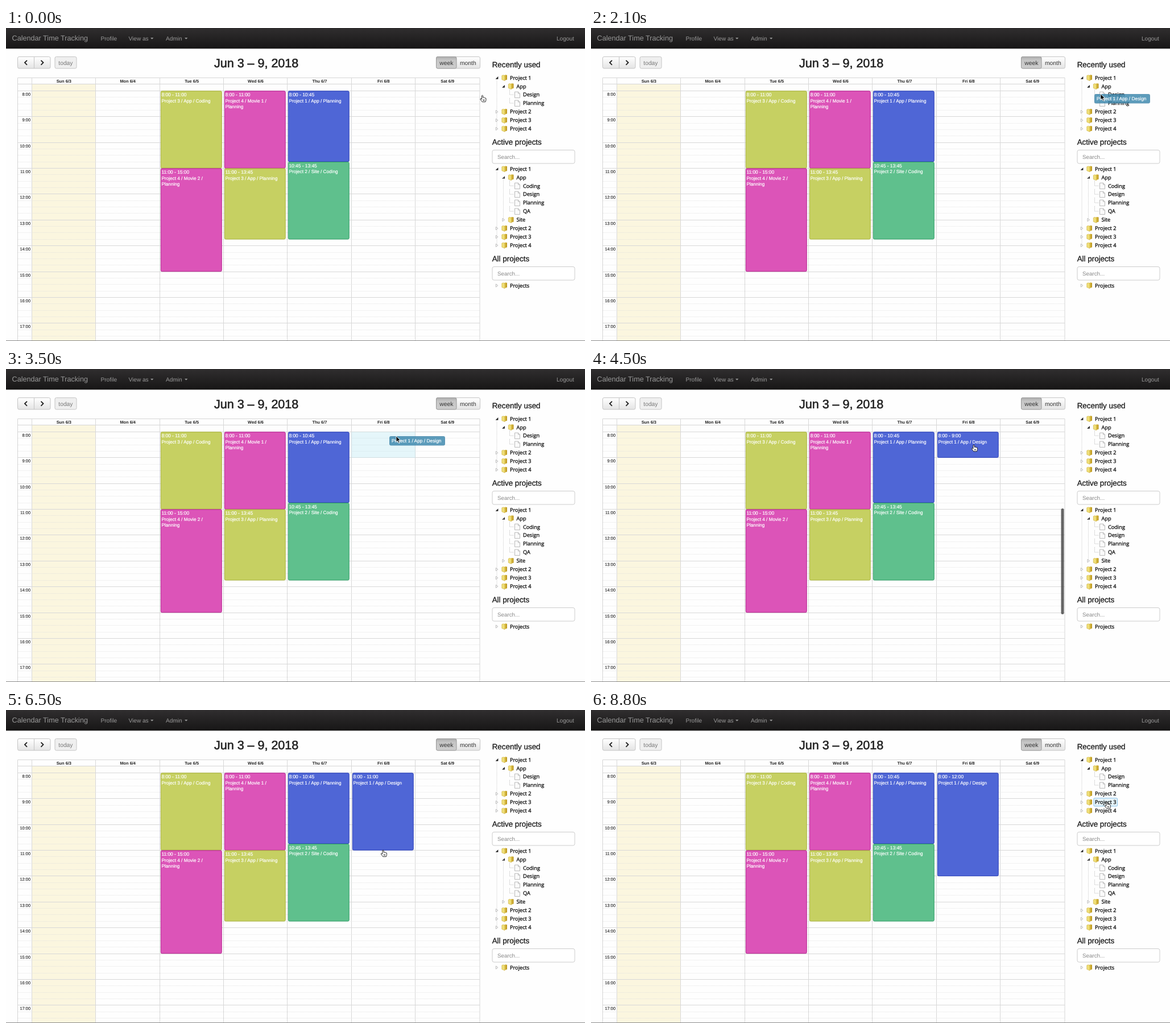
Animation of 1018 by 550 pixels, one loop 9 s. Source, as an HTML page:

```html
<!DOCTYPE html>
<html lang="en">
<head>
<meta charset="utf-8">
<title>Calendar Time Tracking</title>
<style>
html, body { margin: 0; width: 100%; height: 100%; overflow: hidden; background: #fefefe; }
svg { display: block; width: 1018px; height: 550px; }
text { font-family: "Liberation Sans", Arial, sans-serif; white-space: pre; text-rendering: geometricPrecision; }
text.tree { font: 9.2px "Open Sans", sans-serif; fill: #000; stroke: #000; stroke-width: .25px; }
.head { font-size: 13.4px; fill: #222; stroke: #222; stroke-width: .35px; }
.nav { font-size: 10.1px; fill: #999; }
.btn { font-size: 10.3px; fill: #333; }
.day { font-size: 7.4px; font-weight: bold; fill: #222; text-anchor: middle; }
.hour { font-size: 7.4px; fill: #222; stroke: #222; stroke-width: .1px; text-anchor: end; }
.time, .name { font-size: 8.4px; fill: #fff; stroke: #fff; stroke-width: .2px; }
.name { font-size: 8.2px; }
</style>
</head>
<body>
<svg id="stage" viewBox="0 0 1018 550">
  <defs>
    <linearGradient id="bar" x2="0" y2="1"><stop stop-color="#302e2f"/><stop offset="1" stop-color="#171616"/></linearGradient>
    <linearGradient id="up" x2="0" y2="1"><stop stop-color="#fff"/><stop offset="1" stop-color="#e4e4e4"/></linearGradient>
    <linearGradient id="down" x2="0" y2="1"><stop stop-color="#adadad"/><stop offset=".3" stop-color="#c6c6c6"/><stop offset="1" stop-color="#cdcdcd"/></linearGradient>
    <linearGradient id="gold" x2="1" y2="0"><stop stop-color="#ecd45a"/><stop offset="1" stop-color="#b8921c"/></linearGradient>
    <g id="folder">
      <path d="M4.5 1.5 6.5.5 10 1V9L5.5 10.5Z" fill="url(#gold)"/>
      <path d="M.8 2 3.5.8 6 3.2V11L.8 8.8Z" fill="#efdf78" stroke="#c9aa3a" stroke-width=".6"/>
    </g>
    <path id="file" d="M.5.5H6.5L9.5 3.5V11H.5ZM6.5.5V3.5H9.5" fill="#fafafa" stroke="#aaa" stroke-width=".8"/>
    <path id="open" d="M2.4-2.4V2.2H-2.4Z" fill="#222"/>
    <path id="shut" d="M-1.6-2.6 2 0-1.6 2.6Z" fill="#fff" stroke="#aaa" stroke-width=".8"/>
  </defs>
  <g id="page"></g>
  <rect id="drop" width="112.5" height="45.4" fill="#bce8f1" opacity=".38"/>
  <g id="fresh"></g>
  <rect id="scroll" x="826.5" y="245" width="5" height="186" rx="2.5" fill="#4a4a4a"/>
  <rect id="hover" height="14" rx="1" fill="#e7f4f9" stroke="#86c1ea"/>
  <g id="trees"></g>
  <g id="chip">
    <rect x=".5" y=".5" width="97" height="15.5" rx="2" fill="#3a87ad" stroke="#3a80a6" opacity=".82"/>
    <text class="name" x="4" y="11" style="font-size:8.4px">Project 1 / App / Design</text>
  </g>
  <path id="arrow" d="M0 0V10.2L2.4 8 4 11.7 5.8 10.9 4.2 7.4H7.4Z" fill="#000" stroke="#fff" stroke-width=".8"/>
  <path id="hand" d="M-1.1 1Q0-.7 1.1 1V4.3Q2.2 3.5 3 4.6 4 3.9 4.8 5 6.2 4.6 6.4 6V8.5Q6.2 10 5.4 11.8H-.2Q-1.6 10-3.6 7.4-3.8 5.8-2.4 6.2L-1.1 7.3ZM1.6 7.6V10M3.3 7.6V10" fill="#fff" stroke="#111" stroke-width=".9" stroke-linejoin="round"/>
</svg>
<script>
const $ = id => document.getElementById(id);
const LOOP = 9000, STEP = 100;
const X0 = 45.3, COL = 112.4, Y8 = 110.5, SLOT = 11.34, TOP = Y8 - SLOT;

const rect = (x, y, w, h, fill, more = '') =>
  `<rect x="${x}" y="${y}" width="${w}" height="${h}" fill="${fill}" ${more}/>`;
const text = (cls, x, y, s, more = '') => `<text class="${cls}" x="${x}" y="${y}" ${more}>${s}</text>`;
const path = (d, stroke, more = '') => `<path d="${d}" fill="none" stroke="${stroke}" ${more}/>`;
const use = (id, x, y) => `<use href="#${id}" x="${x}" y="${y}"/>`;
const slotY = n => Y8 + n * SLOT;
const dayX = day => Math.floor(X0 + day * COL);
const clock = n => `${8 + Math.floor(n / 4)}:${String(n % 4 * 15).padStart(2, '0')}`;

const paint = {
  lime: ['#c6d062', '#a8b23a'], pink: ['#dc54b8', '#b5218f'],
  blue: ['#4f66d6', '#2a3fb8'], green: ['#5fc08d', '#2f9d66']
};

// from and to count quarter hours after 8:00
function eventBox(day, from, to, color, lines) {
  const x = dayX(day) + 2.3, y = slotY(from) + .3, [fill, edge] = paint[color];
  return rect(x, y, 106.9, slotY(to) - slotY(from) - .6, fill, `stroke="${edge}" rx="2"`) +
    text('time', x + 1.1, y + 9.3, `${clock(from)} - ${clock(to)}`) +
    lines.map((s, i) => text('name', x + 1.2, y + 19.9 + i * 10.7, s)).join('');
}

function navbar() {
  const caret = x => `<path d="M${x} 17h5.4l-2.7 2.8Z" fill="#999"/>`;
  return rect(0, 0, 1018, 36.3, 'url(#bar)') +
    text('nav', 10.5, 22, 'Calendar Time Tracking', 'style="font-size:12.65px"') +
    text('nav', 166.5, 21.5, 'Profile') + text('nav', 215.5, 21.5, 'View as') + caret(254) +
    text('nav', 281, 21.5, 'Admin') + caret(314) + text('nav', 968, 21.5, 'Logout');
}

function toolbar() {
  const box = (x, w, fill = 'url(#up)') =>
    rect(x, 50.5, w, 20.5, fill, 'rx="2.5" stroke="#c4c4c4"');
  const chevron = (x, d) => path(`M${x - 2 * d} 56.8L${x + 2 * d} 60.8L${x - 2 * d} 64.8`, '#222', 'stroke-width="1.9"');
  return box(20.5, 57.5) + path('M49.5 50.5V71', '#c4c4c4') + chevron(35, -1) + chevron(63.5, 1) +
    box(86, 38, '#efefef') + text('btn', 92.3, 64.6, 'today', 'style="fill:#777"') +
    box(756.5, 77) + rect(756.5, 50.5, 35.5, 20.5, 'url(#down)', 'rx="2.5" stroke="#999"') +
    text('btn', 762.3, 64.6, 'week') + text('btn', 798, 64.6, 'month') +
    text('btn', 366, 69.3, 'Jun 3 – 9, 2018', 'style="font-size:21.5px;fill:#222;stroke:#222;stroke-width:.6px"');
}

function grid() {
  let s = rect(X0, 98.5, COL, 451, '#fbf6df');
  for (let n = 0; n < 40; n++) {
    const y = Math.floor(slotY(n)) + .5;
    s += n % 4 ? path(`M21 ${y}H833`, '#dcdcdc', 'stroke-dasharray="1 1" opacity=".75"') : path(`M21 ${y}H833`, '#d8d8d8');
    if (n % 4 === 0) s += text('hour', 43, y + 8.4, clock(n));
  }
  s += path('M20.5 550V87.5H833V550M20.5 98.5H833', '#d6d6d6');
  'Sun Mon Tue Wed Thu Fri Sat'.split(' ').forEach((d, i) => {
    s += path(`M${dayX(i) + .5} 87.5V550`, '#d8d8d8');
    s += text('day', X0 + (i + .5) * COL + .3, 95.8, `${d} 6/${i + 3}`);
  });
  return s;
}

const events =
  eventBox(2, 0, 12, 'lime', ['Project 3 / App / Coding']) +
  eventBox(2, 12, 28, 'pink', ['Project 4 / Movie 2 /', 'Planning']) +
  eventBox(3, 0, 12, 'pink', ['Project 4 / Movie 1 /', 'Planning']) +
  eventBox(3, 12, 23, 'lime', ['Project 3 / App / Planning']) +
  eventBox(4, 0, 11, 'blue', ['Project 1 / App / Planning']) +
  eventBox(4, 11, 23, 'green', ['Project 2 / Site / Coding']);

const search = y => rect(855, y + .5, 145, 23.5, '#fff', 'rx="3" stroke="#ccc"') +
  text('nav', 864, y + 15.8, 'Search...', 'style="font-size:9.8px;fill:#888"');

const sidebar = text('head', 854.7, 69, 'Recently used') + text('head', 854.7, 205.3, 'Active projects') +
  text('head', 854.7, 410, 'All projects') + search(214) + search(419);

// each row: depth, state (+ shut, - open, . leaf), label
function tree(y0, rows) {
  const y = i => y0 + i * 14.93;
  const last = rows.length - 1;
  const dots = 'stroke-dasharray="1 1"';
  let s = last ? path(`M863 ${y0}V${y(last)}`, '#ccc', dots) : '';
  rows.forEach((row, i) => {
    const depth = +row[0], kind = row[1], x = 863 + depth * 11.5;
    if (kind === '.') {
      s += path(`M885.5 ${y(i) - 9}V${y(i)}H893`, '#bbb', dots) + use('file', 894, y(i) - 5.5);
    } else {
      if (row.slice(2) === 'Site') s += path(`M874.5 ${y(1)}V${y(i)}`, '#ccc', dots);
      s += use(kind === '-' ? 'open' : 'shut', x, y(i) + .2) + use('folder', x + 8, y(i) - 5.5);
    }
    s += text('tree', 886 + depth * 11.5, y(i) + 3.3, row.slice(2), 'data-row');
  });
  return s;
}

const rest = ['0+Project 2', '0+Project 3', '0+Project 4'];
$('page').innerHTML = rect(0, 0, 1018, 550, '#fefefe') + navbar() + toolbar() + grid() + events +
  sidebar + rect(0, 549, 1018, 1, '#8a8a8a');
$('trees').innerHTML =
  tree(87.3, ['0-Project 1', '1-App', '2.Design', '2.Planning', ...rest]) +
  tree(247.4, ['0-Project 1', '1-App', '2.Coding', '2.Design', '2.Planning', '2.QA', '1+Site', ...rest]) +
  tree(452.3, ['0+Projects']);

const labels = [...document.querySelectorAll('[data-row]')].map(el => ({
  x: +el.getAttribute('x') - 2, y: el.getAttribute('y') - 10.3, w: el.getComputedTextLength() + 4
}));

// [ms, x, y]
const cursorKeys = [
  [0, 837.5, 118], [300, 850, 119], [900, 906, 118.5], [2000, 906, 118.5], [2100, 896, 116],
  [2600, 794, 107.5], [3500, 686, 118], [3700, 678, 119], [4200, 678, 122], [5100, 663, 155],
  [5400, 663, 156], [5800, 663, 166], [6900, 663, 291.5], [7100, 663, 291.5], [7500, 905, 288],
  [7700, 926, 297], [7800, 928.5, 309], [8000, 930, 312], [8600, 908, 172], [8800, 907, 161.5], [9000, 907, 161.5]
];
const chipKeys = [[2100, 885, 116], [2600, 788, 109], [3500, 674, 118], [3700, 666, 119]];

function along(keys, t) {
  const i = Math.max(1, keys.findIndex(k => k[0] >= t));
  const a = keys[i - 1], b = keys[i];
  const p = Math.min(1, Math.max(0, (t - a[0]) / (b[0] - a[0])));
  return [a[1] + (b[1] - a[1]) * p, a[2] + (b[2] - a[2]) * p];
}

const show = (id, on) => { $(id).style.display = on ? '' : 'none'; };
const move = (id, [x, y]) => $(id).setAttribute('transform', `translate(${x} ${y})`);
const set = (id, attrs) => { for (const k in attrs) $(id).setAttribute(k, attrs[k]); };

function draw(t) {
  const pos = along(cursorKeys, t);
  const dragging = t >= 2100 && t < 3700, dropped = t >= 3700;
  const useArrow = t >= 300 && t < 3700;
  show('arrow', useArrow);
  show('hand', !useArrow);
  move(useArrow ? 'arrow' : 'hand', pos);

  show('chip', dragging);
  if (dragging) move('chip', along(chipKeys, t));
  const col = Math.floor((pos[0] - X0) / COL);
  show('drop', dragging && col < 7);
  set('drop', { x: X0 + col * COL, y: TOP + Math.floor((pos[1] - TOP) / SLOT) * SLOT });

  const end = t < 5400 ? 4 : t > 6900 ? 16 : Math.round((pos[1] - Y8) / SLOT);
  $('fresh').innerHTML = dropped ? eventBox(5, 0, end, 'blue', ['Project 1 / App / Design']) : '';

  // the highlight trails the pointer by one step
  const [hx, hy] = along(cursorKeys, Math.max(0, t - STEP));
  const hit = !dragging && labels.find(l => hx >= l.x - 1 && hx <= l.x + l.w && hy >= l.y && hy < l.y + 14.9);
  show('hover', hit);
  if (hit) set('hover', { x: hit.x, y: hit.y, width: hit.w });

  const fade = (from, to) => t < from ? 0 : Math.min(1, Math.max(0, (to - t) / 200));
  $('scroll').style.opacity = .85 * Math.max(fade(3800, 4700), fade(7200, 8400));
}

function tick() {
  const t = performance.now() % LOOP;
  draw(Math.min(8800, Math.floor(t / STEP) * STEP));
  requestAnimationFrame(tick);
}
tick();
</script>
</body>
</html>
```
